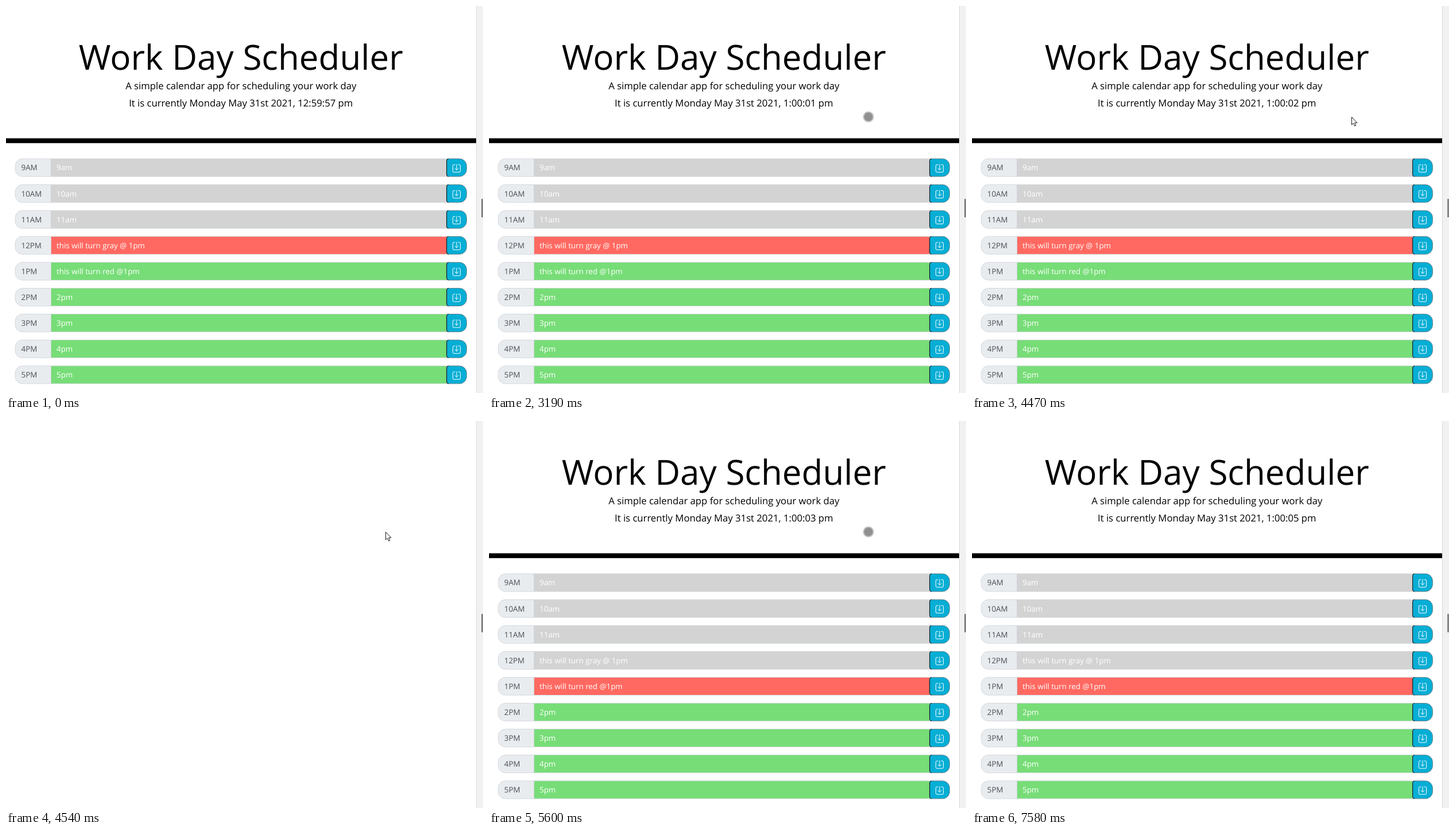
These frames come from a looping animation (831 by 674 pixels, 8000 ms). An HTML page:

```html
<!DOCTYPE html>
<html lang="en">
<head>
<meta charset="utf-8">
<title>Work Day Scheduler</title>
<style>
  html, body { margin: 0; width: 100%; height: 100%; overflow: hidden; background: #fff; }
  svg { display: block; width: 831px; height: 674px; }
  text { font-family: "Open Sans", "Noto Sans", sans-serif; text-rendering: geometricPrecision; }
  .head { text-anchor: middle; font-size: 16.7px; }
  .head .big { font-size: 60.1px; }
  .row text { font-size: 13.36px; }
  .label { fill: #495057; }
  .note { fill: #fff; }
  .icon { fill: none; stroke: #fff; stroke-width: 1; stroke-linecap: round; stroke-linejoin: round; }
</style>
</head>
<body>
<svg viewBox="0 0 831 674">
  <g id="page">
    <g class="head">
      <text class="big" x="409.3" y="110.8">Work Day Scheduler</text>
      <text x="409.3" y="144.8">A simple calendar app for scheduling your work day</text>
      <text id="clock" x="409.3" y="174.8"></text>
    </g>
    <g id="body">
      <rect y="230.4" width="819.5" height="8.4"/>
      <g id="rows"></g>
    </g>
  </g>
  <rect x="819" width="12" height="674" fill="#f1f1f1"/>
  <rect x="819" width="1" height="674" fill="#d8d8d8"/>
  <rect x="828" y="336" width="3" height="32" fill="#858585"/>
  <g id="dot">
    <circle r="8.6" fill="none" stroke="#777" stroke-opacity=".45" stroke-width="2"/>
    <circle r="7.6" fill="#464646" fill-opacity=".6"/>
  </g>
  <path id="arrow" transform="translate(661.5 193.5)" fill="#fff" stroke="#000" stroke-width=".9"
    d="M0 0V13.4L3 10.6L5.2 15.5L7.3 14.6L5.2 9.8H9.4Z"/>
</svg>
<script>
  const LOOP = 8000;
  const SHIFT = -16.7;
  const GRAY = '#d3d3d3', RED = '#ff6961', GREEN = '#77dd77';
  const $ = id => document.getElementById(id);

  const rows = [
    ['9AM', '9am'], ['10AM', '10am'], ['11AM', '11am'],
    ['12PM', 'this will turn gray @ 1pm'], ['1PM', 'this will turn red @1pm'],
    ['2PM', '2pm'], ['3PM', '3pm'], ['4PM', '4pm'], ['5PM', '5pm']
  ];

  // [start, time of day]; an empty time collapses its line
  const clock = [
    [0, '12:59:57'], [190, '12:59:58'], [1200, '12:59:59'], [2200, '1:00:00'],
    [3190, '1:00:01'], [4200, '1:00:02'], [4610, ''], [5600, '1:00:03'],
    [6590, '1:00:04'], [7580, '1:00:05']
  ];

  // [start, shape, x, y]
  const pointer = [
    [0, ''],
    [390, 'dot', 814, 656], [460, 'dot', 801, 600], [530, 'dot', 780, 522],
    [600, 'dot', 754, 434], [670, 'dot', 727, 352], [740, 'dot', 702, 285],
    [810, 'dot', 680, 236], [880, 'dot', 664, 208], [945, 'dot', 653, 196],
    [1010, 'dot', 661, 193],
    [3460, 'arrow'],
    [4610, 'dot', 661, 193], [6850, 'dot', 692, 226], [6920, 'dot', 738, 278],
    [6990, '']
  ];

  const page = [[0, true], [4540, false], [4610, true]];
  const hour = [[0, 3], [4540, 4]];

  $('rows').innerHTML = rows.map(([label, note], i) => `
    <g class="row" transform="translate(0 ${(265.6 + i * 45.1).toFixed(1)})">
      <path d="M78.5 .4H28.5a12.5 12.5 0 0 0-12.5 12.5v6a12.5 12.5 0 0 0 12.5 12.5h50z"
        fill="#e9ecef" stroke="#ced4da" stroke-width=".85"/>
      <rect class="slot" x="78.4" y=".4" width="689.4" height="31"
        stroke="#ced4da" stroke-width=".85"/>
      <path d="M771 .4H790a12.5 12.5 0 0 1 12.5 12.5v6a12.5 12.5 0 0 1-12.5 12.5H771a3.3 3.3 0 0 1-3.3-3.3V3.7a3.3 3.3 0 0 1 3.3-3.3z"
        fill="#06aed5" stroke="#6c757d" stroke-width=".85"/>
      <path d="M771 .4a3.3 3.3 0 0 0-3.3 3.3v24.4a3.3 3.3 0 0 0 3.3 3.3"
        fill="none" stroke="#000" stroke-width=".9"/>
      <path class="icon" d="M782 10.8h-2a1.5 1.5 0 0 0-1.5 1.5v10a1.5 1.5 0 0 0 1.5 1.5h10a1.5 1.5 0 0 0 1.5-1.5v-10a1.5 1.5 0 0 0-1.5-1.5h-2M785 10.2v9.6M782 17l3 3l3-3"/>
      <text class="label" x="26.5" y="20.9">${label}</text>
      <text class="note" x="88" y="20.9">${note}</text>
    </g>`).join('');
  const slots = [...document.querySelectorAll('.slot')];

  const at = (steps, t) => steps.reduce((now, s) => s[0] <= t ? s : now);
  const show = (el, on) => { el.style.display = on ? '' : 'none'; };

  function draw(t) {
    const time = at(clock, t)[1];
    $('clock').textContent = time && `It is currently Monday May 31st 2021, ${time} pm`;
    $('body').setAttribute('transform', `translate(0 ${time ? 0 : SHIFT})`);
    show($('page'), at(page, t)[1]);

    const now = at(hour, t)[1];
    slots.forEach((slot, i) =>
      slot.setAttribute('fill', i < now ? GRAY : i > now ? GREEN : RED));

    const [, shape, x, y] = at(pointer, t);
    show($('dot'), shape === 'dot');
    show($('arrow'), shape === 'arrow');
    if (shape === 'dot') $('dot').setAttribute('transform', `translate(${x} ${y})`);
  }

  const start = performance.now();
  function tick() {
    draw((performance.now() - start) % LOOP);
    requestAnimationFrame(tick);
  }
  tick();
</script>
</body>
</html>
```
